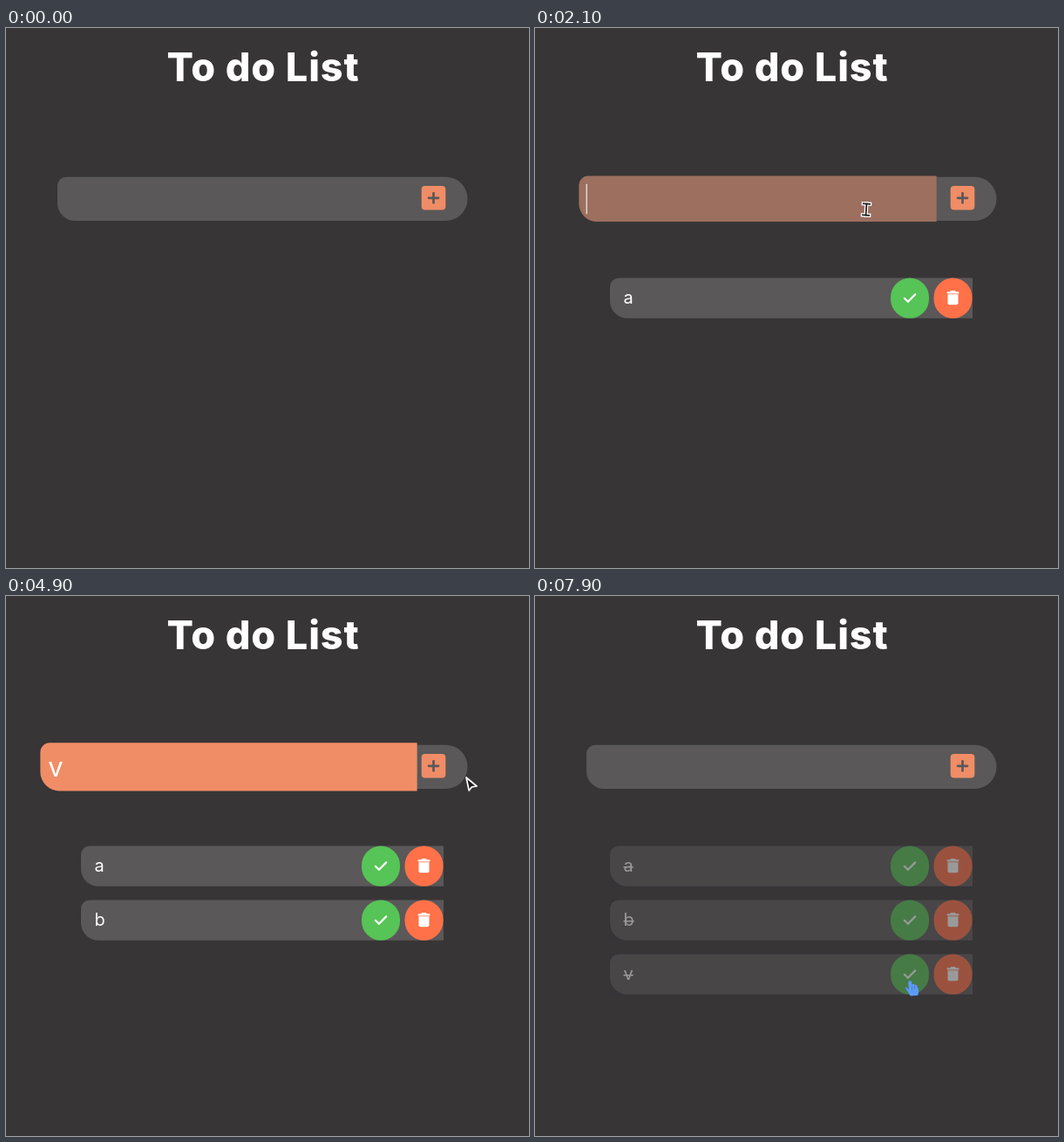
Recreate the animation shown at these times as an HTML page with a canvas. Size 600 px wide and 619 px high, loop 8000 ms.

```html
<!DOCTYPE html>
<html lang="en">
<head>
<meta charset="utf-8">
<title>To do List</title>
<style>
  html, body { margin: 0; width: 100%; height: 100%; overflow: hidden; background: #373536; }
  canvas { display: block; width: 600px; height: 619px; }
</style>
</head>
<body>
<canvas id="stage" width="600" height="619"></canvas>
<script>
const ctx = document.getElementById('stage').getContext('2d');
const LOOP = 8000, STEP = 100, TRAVEL = 300, ROW = 62;
const FONT = 'Inter, "Open Sans", sans-serif';
const BG = '#373536', INK = '#1c1a1b', GREEN = '#56c456', RED = '#ff7148', BLUE = '#5c9bf8';
const WHITE = [255, 255, 255], GREY = [90, 88, 89], ORANGE = [240, 141, 103];

// when each entry's field gets focus, is typed, added and ticked off
const ITEMS = [
  { text: 'a', focus: 350, typed: 700, added: 1050, done: 6060 },
  { text: 'b', focus: 1950, typed: 2450, added: 3000, done: 6820 },
  { text: 'v', focus: 3200, typed: 4150, added: 5250, done: 7420 }
];

// places where the pointer rests, with its time of arrival
const STOPS = [
  { at: 100, x: 335, y: 249 },
  { at: 400, x: 300, y: 205 },
  { at: 1000, x: 507, y: 203 },
  { at: 1500, x: 472, y: 210.5 },
  { at: 1950, x: 380, y: 208 },
  { at: 2700, x: 498, y: 206 },
  { at: 3250, x: 359, y: 208 },
  { at: 4150, x: 528, y: 208 },
  { at: 5200, x: 505, y: 204 },
  { at: 6000, x: 439, y: 309 },
  { at: 6750, x: 433, y: 371 },
  { at: 7400, x: 431, y: 447 },
  { at: 7900, x: 430, y: 441 }
];

const clamp = v => Math.max(0, Math.min(1, v));
const ease = u => u * u * (3 - 2 * u);
const lerp = (a, b, u) => a + (b - a) * u;
const mix = (a, b, u) => `rgb(${a.map((v, i) => Math.round(lerp(v, b[i], u))).join()})`;

// share of the last `span` ms in which a state held: fades in and out evenly
function fade(state, t, span) {
  const samples = 25;
  let on = 0;
  for (let i = 0; i < samples; i++) if (state(t - (i + 0.5) / samples * span)) on++;
  return on / samples;
}

function pointerAt(t) {
  let { x, y } = STOPS[0];
  for (const stop of STOPS) {
    const u = ease(clamp((t - stop.at + TRAVEL) / TRAVEL));
    x = lerp(x, stop.x, u);
    y = lerp(y, stop.y, u);
  }
  return { x, y };
}

const editing = t => ITEMS.find(i => t >= i.focus && t < i.added);

const onButton = ({ x, y }) => y > 171 && y < 221 && x > 452 &&
  (x < 504 || Math.hypot(x - 504, y - 196) < 25);

const onField = ({ x, y }) => y > 168 && y < 223 && x > 40 && x <= 452;

const onRowButton = ({ x, y }, t) => ITEMS.some((item, i) => t >= item.added &&
  [430, 479.5].some(cx => Math.hypot(x - cx, y - 309.6 - i * ROW) < 22.5));

function box(x, y, w, h, radii, fill) {
  ctx.beginPath();
  ctx.roundRect(x, y, w, h, radii);
  ctx.fillStyle = fill;
  ctx.fill();
}

function line(points, width, color) {
  ctx.beginPath();
  points.forEach(([x, y]) => ctx.lineTo(x, y));
  ctx.lineWidth = width;
  ctx.strokeStyle = color;
  ctx.stroke();
}

function label(text, x, y, size, weight = 400) {
  ctx.font = `${weight} ${size}px ${FONT}`;
  ctx.fillStyle = '#fff';
  ctx.fillText(text, x, y);
}

function title() {
  ctx.textAlign = 'center';
  ctx.letterSpacing = '0.9px';
  label('To do List', 295, 61, 45, 800);
  ctx.letterSpacing = '0px';
  ctx.textAlign = 'left';
}

function addButton(hover) {
  const back = mix(GREY, ORANGE, hover);
  box(451.5, 170.7, 78, 50.3, [0, 25, 25, 0], back);
  box(476.7, 181, 27.6, 27.6, 4, mix(ORANGE, WHITE, hover));
  ctx.lineCap = 'round';
  line([[485, 194.8], [496, 194.8]], 2.7, back);
  line([[490.5, 189.3], [490.5, 200.3]], 2.7, back);
}

function field(t) {
  const item = editing(t);
  const level = fade(editing, t, 350);
  const scale = 1 + level * 0.1;
  ctx.save();
  ctx.translate(255.5, 195.8);
  ctx.scale(scale, scale);
  box(-196.5, -25.1, 393, 50.2, [10, 0, 0, 20], mix(GREY, ORANGE, level));
  if (item) {
    const typed = t >= item.typed;
    let caret = -188.5;
    if (typed) {
      label(item.text, caret, 10.2, 28.2);
      caret += ctx.measureText(item.text).width;
    }
    if ((t - (typed ? item.typed : item.focus)) % 1060 < 530) {
      ctx.fillStyle = '#fff';
      ctx.fillRect(caret, -16.3, 1, 33);
    }
  }
  ctx.restore();
}

function row(item, i, t) {
  if (t < item.added) return;
  ctx.save();
  ctx.translate(0, i * ROW);
  box(86, 286.5, 416, 46.3, [10, 0, 0, 20], mix(GREY, GREY, 0));
  box(408, 286.5, 44, 46.3, 22, GREEN);
  box(457.5, 286.5, 44, 46.3, 22, RED);
  label(item.text, 101.5, 316.3, 20);
  if (t >= item.done) ctx.fillRect(101.5, 310, ctx.measureText(item.text).width, 1.5);
  ctx.lineCap = 'round';
  line([[423.8, 309.8], [427.9, 313.7], [436.2, 305.4]], 2.2, '#fff');
  box(472.5, 302.2, 14, 2.2, 1, '#fff');
  box(476.5, 301, 6, 2.5, 1, '#fff');
  box(473.5, 305.3, 12, 12, [0, 0, 2, 2], '#fff');

  // a veil over the row dims all its parts together
  ctx.globalAlpha = 0.5 * ease(clamp((t - item.done - 40) / 420));
  ctx.fillStyle = BG;
  ctx.fillRect(85, 285, 418, 49);
  ctx.restore();
}

function arrow() {
  ctx.beginPath();
  [[0, 0], [3.2, 15], [6.5, 10.8], [12, 10]].forEach(([x, y]) => ctx.lineTo(x, y));
  ctx.closePath();
  ctx.lineJoin = 'round';
  ctx.lineWidth = 1.7;
  ctx.strokeStyle = '#fff';
  ctx.fillStyle = INK;
  ctx.fill();
  ctx.stroke();
}

function textBeam() {
  ctx.rotate(0.07);
  ctx.lineCap = 'square';
  for (const [width, color] of [[4.2, '#fff'], [1.7, INK]]) {
    line([[0, -6.5], [0, 6.5]], width, color);
    for (const y of [-6.5, 6.5]) line([[-3.7, y], [3.7, y]], width, color);
  }
}

function hand() {
  ctx.rotate(-0.1);
  box(-2, 0, 4, 12, 2, BLUE);
  box(1.4, 4.2, 3.6, 8, 1.8, BLUE);
  box(4.3, 5.2, 3.4, 8, 1.7, '#6d8df0');
  ctx.beginPath();
  ctx.moveTo(-6.2, 7);
  ctx.quadraticCurveTo(-4, 6.5, -2, 10);
  ctx.lineTo(8, 8);
  ctx.quadraticCurveTo(10, 13, 7.5, 17.5);
  ctx.lineTo(-1, 17.5);
  ctx.quadraticCurveTo(-4, 12, -6.2, 7);
  ctx.fillStyle = BLUE;
  ctx.fill();
  ctx.lineCap = 'round';
  for (const x of [1.7, 4.6]) line([[x, 6.5], [x, 10.3]], 0.7, '#4674d4');
}

function pointer(t) {
  if (t < STOPS[0].at) return;
  const p = pointerAt(t);
  ctx.save();
  ctx.translate(p.x, p.y);
  if (onField(p)) textBeam();
  else if (onButton(p) || onRowButton(p, t)) hand();
  else arrow();
  ctx.restore();
}

function draw(t) {
  ctx.fillStyle = BG;
  ctx.fillRect(0, 0, 600, 619);
  title();
  addButton(fade(s => onButton(pointerAt(s)), t, 250));
  field(t);
  ITEMS.forEach((item, i) => row(item, i, t));
  pointer(t);
}

const start = performance.now();
function tick() {
  const t = (performance.now() - start) % LOOP;
  draw(Math.floor(t / STEP) * STEP);
  requestAnimationFrame(tick);
}
tick();
</script>
</body>
</html>
```
